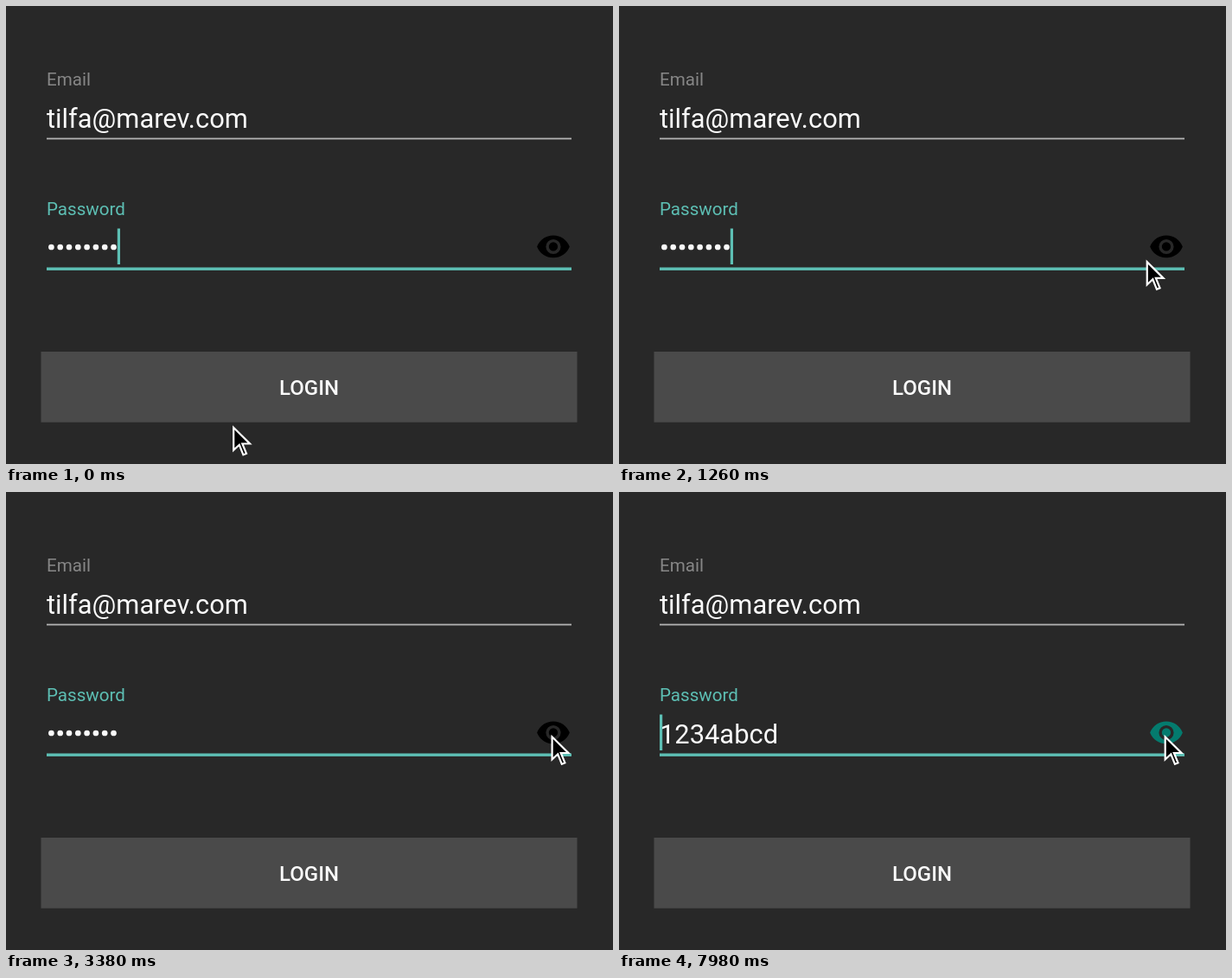
These frames come from a looping animation (702 px wide and 530 px high, 8000 ms). An HTML page:

```html
<!DOCTYPE html>
<html lang="en">
<head>
<meta charset="utf-8">
<title>Login form</title>
<style>
  html, body { margin: 0; width: 100%; height: 100%; overflow: hidden; background: #282828; }
  svg { display: block; width: 702px; height: 530px; font-family: Roboto, sans-serif; }
  .label { font-size: 20.58px; }
  .field { font-size: 30.87px; fill: #fafafa; }
  .login { font-size: 24px; font-weight: 500; fill: #fafafa; text-anchor: middle; }
</style>
</head>
<body>
<svg viewBox="0 0 702 530">
  <rect width="702" height="530" fill="#282828"/>
  <text class="label" x="47" y="91.5" fill="#868686">Email</text>
  <text class="field" x="47" y="140.7">tilfa@marev.com</text>
  <rect x="47" y="152.6" width="607" height="1.8" fill="#b4b4b4"/>

  <text class="label" x="47" y="241.5" fill="#5dbfb4">Password</text>
  <g id="dots" fill="#fafafa"></g>
  <text id="plain" class="field" x="47" y="291">1234abcd</text>
  <rect x="47" y="302.5" width="607" height="3.4" fill="#5dbfb4"/>
  <rect id="caret" y="257.5" width="3.2" height="41.5" fill="#5dbfb4"/>

  <circle id="ripple" cx="631" cy="284" fill="#fff"/>
  <path id="eye" transform="translate(612.4 257.9) scale(1.715)" fill-rule="evenodd"
    d="M12 4.5C7 4.5 2.73 7.61 1 12c1.73 4.39 6 7.5 11 7.5s9.27-3.11 11-7.5c-1.73-4.39-6-7.5-11-7.5z
       M7 12a5 5 0 0 0 10 0a5 5 0 0 0-10 0z M9 12a3 3 0 0 0 6 0a3 3 0 0 0-6 0z"/>

  <rect x="40.5" y="400" width="620" height="81.7" fill="#4a4a4a"/>
  <text class="login" x="350.5" y="450.3">LOGIN</text>

  <path id="pointer" d="M1.2 2.8V29L7.8 22.8L12.4 34.4L16 32.9L11.3 21.5H20Z"
    stroke="#fff" stroke-width="2.2"/>
</svg>
<script>
const LOOP = 8000, REVEAL = 4760;
const $ = id => document.getElementById(id);
const show = (id, on) => $(id).setAttribute('visibility', on ? 'visible' : 'hidden');

$('dots').innerHTML = Array.from({ length: 8 }, (_, i) =>
  `<circle cx="${52.4 + 10.3 * i}" cy="279" r="3.35"/>`).join('');

// Pointer tip: time, x, y
const path = [
  [100, 262, 485], [420, 499.5, 375], [880, 579, 320], [980, 579, 320], [1260, 609.5, 293.5],
  [1720, 620.5, 284], [1820, 620.5, 284], [2000, 629.3, 280], [2140, 630, 280.5],
  [3120, 630, 280.5], [3500, 630.5, 280.5]
];
// The caret starts visible and toggles at each of these times
const blinks = [320, 820, 1320, 1820, 3320, 4640, 5460, 6200, 6460, 7320, 7480, 7980];
// Ripple start and length
const taps = [[3960, 260], [REVEAL, 180]];

const rate = (i, k) => (path[i + 1][k] - path[i][k]) / (path[i + 1][0] - path[i][0]);

// Tangent that never overshoots: harmonic mean of the neighbouring rates
function slope(i, k) {
  if (i === 0 || i === path.length - 1) return 0;
  const a = rate(i - 1, k), b = rate(i, k);
  return a * b > 0 ? 2 * a * b / (a + b) : 0;
}

function along(t, k) {
  const last = path.length - 1;
  if (t <= path[0][0]) return path[0][k];
  if (t >= path[last][0]) return path[last][k];
  const i = path.findIndex(p => p[0] > t) - 1;
  const [p, q] = [path[i], path[i + 1]];
  const h = q[0] - p[0], u = (t - p[0]) / h, v = 1 - u;
  return v * v * (1 + 2 * u) * p[k] + u * u * (1 + 2 * v) * q[k]
    + h * u * v * (v * slope(i, k) - u * slope(i + 1, k));
}

function draw(t) {
  const open = t >= REVEAL;
  show('dots', !open);
  show('plain', open);
  $('eye').setAttribute('fill', open ? '#047b6e' : '#000');

  show('caret', blinks.filter(b => b <= t).length % 2 === 0);
  $('caret').setAttribute('x', open ? 47 : 128.8);

  const tap = taps.find(([start, len]) => t >= start && t < start + len);
  show('ripple', tap);
  if (tap) {
    const u = (t - tap[0]) / tap[1];
    $('ripple').setAttribute('r', 46 * Math.min(1, 0.4 + u));
    $('ripple').setAttribute('opacity', 0.2 * Math.min(1, 2 - 2 * u));
  }

  $('pointer').setAttribute('transform', `translate(${along(t, 1)} ${along(t, 2)})`);
}

const begin = performance.now();
function tick() {
  draw((performance.now() - begin) % LOOP);
  requestAnimationFrame(tick);
}
tick();
</script>
</body>
</html>
```
